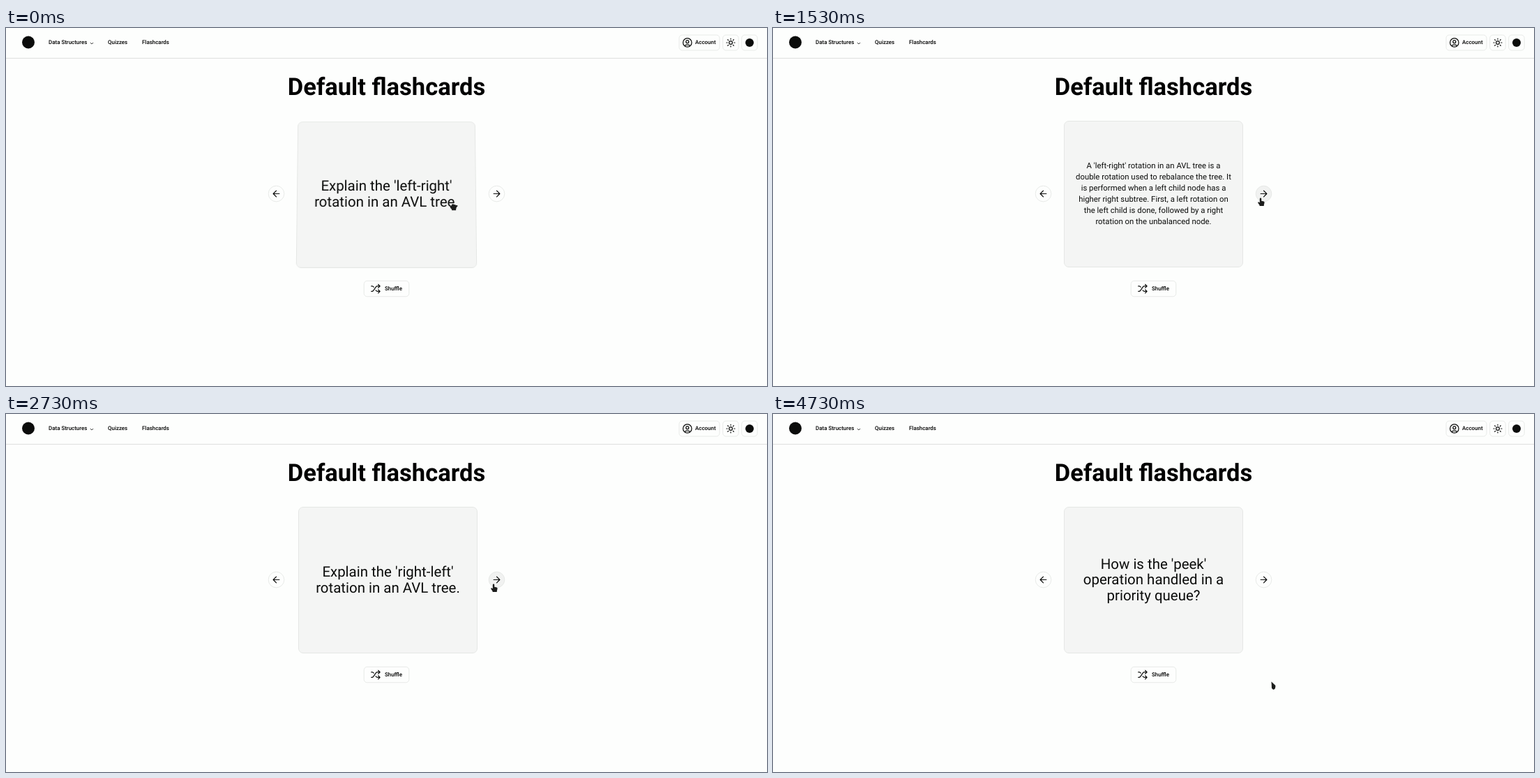
An HTML page for the animation above (4990 ms loop, 1091 by 513 pixels).

```html
<!DOCTYPE html>
<html lang="en">
<head>
<meta charset="utf-8">
<title>Flashcards</title>
<style>
  html, body { margin: 0; width: 100%; height: 100%; overflow: hidden; background: #fdfefd; }
  body { position: relative; font-family: Roboto, sans-serif; color: #0b0c0b; text-rendering: geometricPrecision; }
  svg { position: absolute; left: 0; top: 0; width: 1091px; height: 513px; }
  .box { fill: #fdfefd; stroke: #e3e5e3; stroke-width: .8; }
  .box.hover { fill: #f1f2f1; }
  .icon { fill: none; stroke: #0b0c0b; stroke-width: 2; stroke-linecap: round; stroke-linejoin: round; }
  .label { font-size: 7.95px; font-weight: 500; }
  .title { font-size: 34.5px; font-weight: 700; text-anchor: middle; }
  #viewport { position: absolute; left: 408px; top: 120px; width: 275px; height: 235px; overflow: hidden; }
  .card { position: absolute; left: 9px; top: 13px; width: 257px; height: 209.5px; perspective: 568px; }
  .face {
    position: absolute; inset: 0; box-sizing: border-box; display: flex; align-items: center; justify-content: center;
    text-align: center; white-space: pre; background: #f4f5f4; border: 1px solid #e5e7e5; border-radius: 7px;
    backface-visibility: hidden; font-size: 20.45px; line-height: 22.72px;
  }
  .back { font-size: 11.36px; line-height: 15.9px; }
</style>
</head>
<body>
<svg viewBox="0 0 1091 513">
  <rect y="42.8" width="1091" height="1.2" fill="#e1e3e1"/>
  <circle cx="32" cy="20.5" r="9" fill="#0b0c0b"/>
  <g class="label">
    <text x="61" y="23.3">Data Structures</text>
    <text x="146" y="23.3">Quizzes</text>
    <text x="195" y="23.3">Flashcards</text>
  </g>
  <path class="icon" d="M121.2 21.2l1.8 1.7 1.8-1.7" style="stroke-width:.8"/>

  <rect class="box" x="965" y="10" width="58" height="22" rx="4.5"/>
  <rect class="box" x="1027.7" y="10" width="22.5" height="22" rx="4.5"/>
  <rect class="box" x="1054.7" y="10" width="22.5" height="22" rx="4.5"/>
  <g class="icon" transform="translate(969.4 13.5) scale(.62)">
    <circle cx="12" cy="12" r="10"/><circle cx="12" cy="10" r="3.2"/>
    <path d="M7 20.7V19a2 2 0 0 1 2-2h6a2 2 0 0 1 2 2v1.7"/>
  </g>
  <text class="label" x="988" y="23.3">Account</text>
  <g class="icon" id="sun" transform="translate(1039 21) scale(.6)"><circle r="4"/></g>
  <circle cx="1066" cy="21" r="6" fill="#0b0c0b"/>

  <text class="title" x="545.5" y="96.3">Default flashcards</text>

  <circle class="box" cx="387.5" cy="237.5" r="11.3"/>
  <circle class="box" id="next" cx="703.5" cy="237.5" r="11.3"/>
  <path class="icon" transform="translate(387.5 237.5) scale(.62)" d="M7 0H-7M0 7L-7 0L0-7"/>
  <path class="icon" transform="translate(703.5 237.5) scale(.62)" d="M-7 0H7M0 7L7 0L0-7"/>

  <rect class="box" id="shuffle" x="513.2" y="362.4" width="64.6" height="22.4" rx="4.5"/>
  <path class="icon" transform="translate(522.5 366.2) scale(.62)"
    d="M2 18h1.4c1.3 0 2.5-.6 3.3-1.7l6.1-8.6c.7-1.1 2-1.7 3.3-1.7H22M18 2l4 4-4 4M2 6h1.9c1.5 0 2.9.9 3.6 2.2M22 18h-5.9c-1.3 0-2.6-.7-3.3-1.8l-.5-.8M18 14l4 4-4 4"/>
  <text class="label" x="543" y="376.2">Shuffle</text>
</svg>

<div id="viewport">
  <div class="card" id="first">
    <div class="face front">Explain the 'left-right'
rotation in an AVL tree.</div>
    <div class="face back">A 'left-right' rotation in an AVL tree is a
double rotation used to rebalance the tree. It
is performed when a left child node has a
higher right subtree. First, a left rotation on
the left child is done, followed by a right
rotation on the unbalanced node.</div>
  </div>
  <div class="card" id="second"><div class="face"></div></div>
</div>

<svg viewBox="0 0 1091 513"><path id="cursor" fill="#1c1d1c"/></svg>

<script>
const LOOP = 4990, FRAME = 1000 / 15;
const FLIP_TIME = 600, FLIP_START = -18, UNFLIP_START = 1920;
const SLIDE_START = 2002, PITCH = 284, SHUFFLE_AT = 4265;

const $ = s => document.querySelector(s);
const first = $('#first'), second = $('#second'), question = $('#second .face');
const front = $('.front'), back = $('.back'), cursor = $('#cursor');

const QUESTIONS = [
  "Explain the 'right-left'\nrotation in an AVL tree.",
  "How is the 'peek'\noperation handled in a\npriority queue?"
];

// Cursor shapes, drawn from the hotspot.
const SHAPES = {
  hand: 'M-1.2 1.2a1.2 1.2 0 0 1 2.4 0V4.2L4.6 5Q5.7 5.4 5.6 6.8L4.8 10V11.6H-1.4V10.4L-3.8 6.9Q-3.8 5.4-2.4 5.9L-1.2 6.8Z',
  fist: 'M-1.4 3.4Q-.6 2 1 2.8L4.6 4Q5.8 4.8 5.6 6.8L4.6 9.8V11.6H-1.4V10.2L-3.8 7.6Q-4 5.6-2 5.2Z',
  arrow: 'M0 0L5.8 5.6Q6.4 7.6 5 10.4L2.6 11.4L.5 9.4Z'
};

// time, x, y of the hotspot
const PATH = [
  [935, 640.5, 249.7], [1000, 663.5, 251], [1067, 680, 252], [1133, 688, 250.5], [1200, 693, 248.5],
  [1533, 699, 243.5], [2935, 699, 243.5], [3000, 701, 247], [3067, 657, 297], [3133, 597.5, 336.7],
  [3200, 565, 352], [3267, 547, 362], [3467, 531, 369], [3733, 529.5, 368.5],
  [4267, 529.5, 368.5], [4333, 553, 372], [4533, 678, 382], [4733, 714.5, 383.5]
];

for (let a = 0; a < 360; a += 45) {
  const ray = document.createElementNS('http://www.w3.org/2000/svg', 'path');
  ray.setAttribute('d', 'M0-8V-10');
  ray.setAttribute('transform', `rotate(${a})`);
  $('#sun').append(ray);
}

const clamp = v => Math.min(1, Math.max(0, v));

// cubic-bezier(.25, .1, .25, 1)
function ease(x) {
  if (x <= 0 || x >= 1) return clamp(x);
  let lo = 0, hi = 1;
  for (let i = 0; i < 24; i++) {
    const s = (lo + hi) / 2;
    if (.75 * s * (1 - s) + s ** 3 < x) lo = s; else hi = s;
  }
  return .3 * lo * (1 - lo) ** 2 + 3 * lo * lo * (1 - lo) + lo ** 3;
}

// Share of the slide still to go: a damped pull, stepped at 60 Hz, in closed form.
function slideLeft(t) {
  const n = Math.max(0, (t - SLIDE_START) * .06);
  return 1.8506 * .8806 ** n - .8506 * .7722 ** n;
}

function cursorAt(t) {
  const i = PATH.findIndex(p => p[0] > t);
  if (i === 0) return PATH[0].slice(1);
  if (i < 0) return PATH[PATH.length - 1].slice(1);
  const [a, b] = [PATH[i - 1], PATH[i]];
  const k = (t - a[0]) / (b[0] - a[0]);
  return [a[1] + (b[1] - a[1]) * k, a[2] + (b[2] - a[2]) * k];
}

const inside = (x, y, l, t, r, b) => x >= l && x <= r && y >= t && y <= b;

function draw(t) {
  const turn = t < UNFLIP_START
    ? ease((t - FLIP_START) / FLIP_TIME)
    : 1 - ease((t - UNFLIP_START) / FLIP_TIME);
  front.style.transform = `rotateX(${180 * turn}deg)`;
  back.style.transform = `rotateX(${180 * turn - 180}deg)`;

  const left = slideLeft(t) * PITCH;
  first.style.transform = `translateX(${left - PITCH}px)`;
  second.style.transform = `translateX(${left}px)`;
  const text = QUESTIONS[t < SHUFFLE_AT ? 0 : 1];
  if (question.textContent !== text) question.textContent = text;

  const [x, y] = cursorAt(t);
  const onNext = inside(x, y, 692, 226, 715, 249);
  const onShuffle = inside(x, y, 513, 362, 578, 385);
  const onCard = inside(x, y, 417, 133, 674, 342);
  $('#next').classList.toggle('hover', onNext);
  $('#shuffle').classList.toggle('hover', onShuffle);
  const shape = t < 130 ? 'fist' : onNext || onShuffle || onCard ? 'hand' : 'arrow';
  cursor.setAttribute('d', SHAPES[shape]);
  cursor.setAttribute('transform', `translate(${x} ${y})`);
}

const start = performance.now();
function tick() {
  const t = (performance.now() - start) % LOOP;
  draw(Math.floor((t + 4) / FRAME) * FRAME);
  requestAnimationFrame(tick);
}
tick();
</script>
</body>
</html>
```
